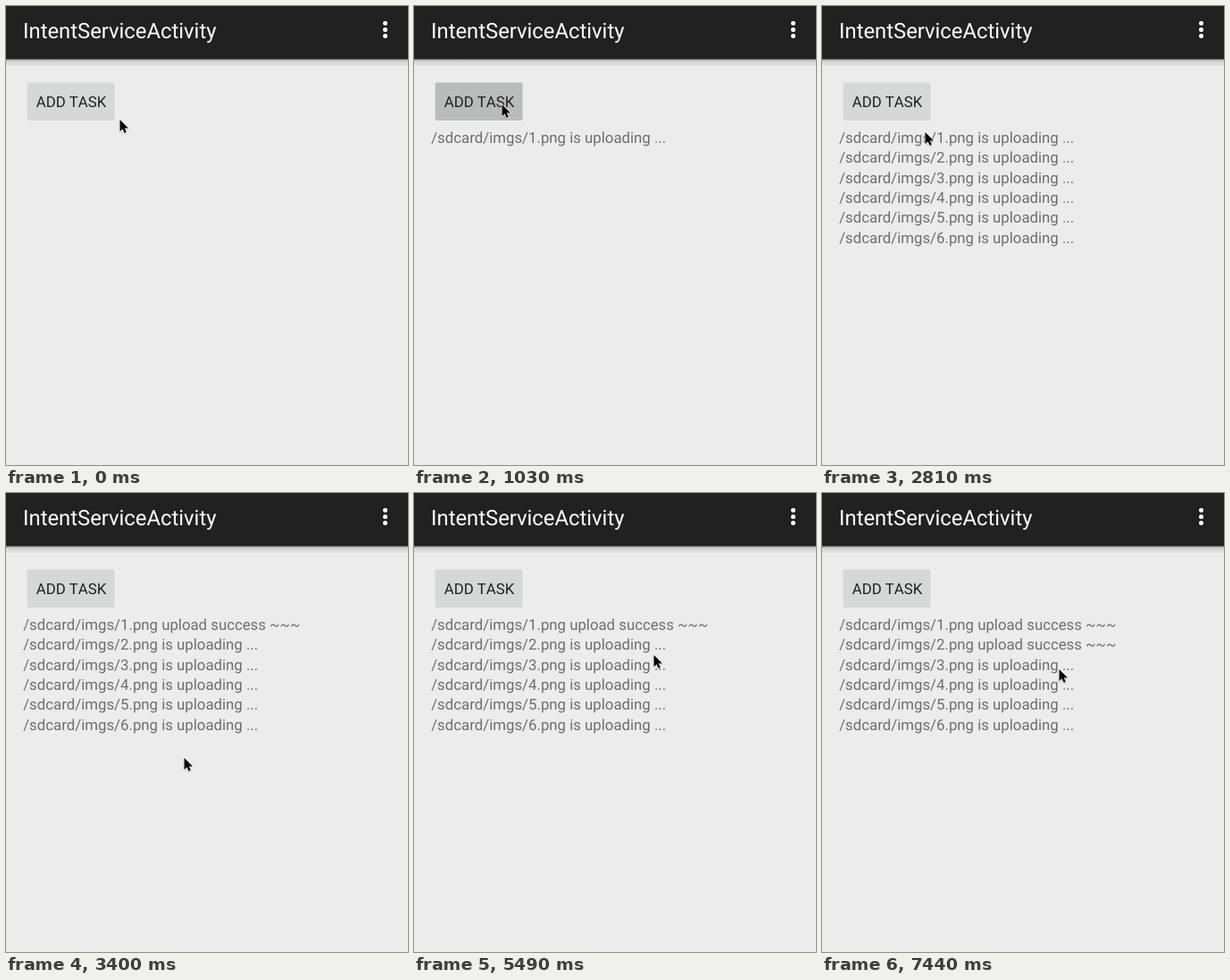
These frames come from a looping animation (450 px wide and 513 px high, 8 s). An HTML page:

```html
<!DOCTYPE html>
<html lang="en">
<head>
<meta charset="utf-8">
<title>IntentServiceActivity</title>
<style>
  html, body { margin: 0; width: 100%; height: 100%; overflow: hidden; background: #ececec; }
  svg { display: block; width: 450px; height: 513px; }
  text {
    font-family: Roboto, sans-serif; font-size: 16.8px;
    font-kerning: none; text-rendering: geometricPrecision;
  }
  .title { font-size: 23.85px; }
</style>
</head>
<body>
<svg viewBox="0 0 450 513">
  <defs>
    <linearGradient id="fade" x1="0" y1="0" x2="0" y2="1">
      <stop offset="0" stop-opacity=".45"/>
      <stop offset=".25" stop-opacity=".13"/>
      <stop offset="1" stop-opacity=".02"/>
    </linearGradient>
    <path id="arrow" d="M1.5 .9V14.2L4.6 11.4L6.7 16L8.8 15.1L6.8 10.6H11Z"/>
    <filter id="soft" x="-50%" y="-50%" width="200%" height="200%">
      <feGaussianBlur stdDeviation=".8"/>
    </filter>
  </defs>
  <rect width="450" height="513" fill="#ececec"/>
  <rect y="59.5" width="450" height="7.5" fill="url(#fade)"/>
  <rect width="450" height="59.5" fill="#212121"/>
  <text class="title" x="19" y="36.4" fill="#fff">IntentServiceActivity</text>
  <g id="dots" fill="#fff"></g>
  <rect id="button" x="23.7" y="85.6" width="97.8" height="42.4" rx="2"/>
  <text x="73" y="113" fill="#212121" text-anchor="middle">ADD TASK</text>
  <g id="list" fill="#6e6e6e"></g>
  <g id="cursor">
    <use href="#arrow" y="1.2" opacity=".35" filter="url(#soft)"/>
    <use href="#arrow" stroke="#fff" stroke-width="1.4" stroke-linejoin="round" style="paint-order:stroke"/>
  </g>
</svg>
<script>
  const LOOP = 8000, BEAT = 148.8, LEAD = 0.18;
  const byId = id => document.getElementById(id);
  const button = byId('button'), list = byId('list'), cursor = byId('cursor');

  // Cursor glides in beats: start, end, x, y
  const glides = [
    [0, 1, 97, 109], [18, 19, 114, 140], [19, 20, 198, 295], [32, 33, 220, 234],
    [33, 37, 267, 180], [44, 46, 266, 188], [48, 50, 264, 196]
  ];
  const taps = [3, 8, 10, 11, 12, 13];
  const slowTaps = taps.slice(0, 2);
  const doneAt = i => 23 + 20 * i;
  const easeOut = u => Math.sin(u * Math.PI / 2);

  function add(parent, tag, attrs) {
    const el = document.createElementNS('http://www.w3.org/2000/svg', tag);
    for (const key in attrs) el.setAttribute(key, attrs[key]);
    parent.append(el);
    return el;
  }

  for (let i = 0; i < 3; i++) add(byId('dots'), 'circle', { cx: 424.5, cy: 19.2 + 7.2 * i, r: 2.5 });
  const rows = taps.map((_, i) => add(list, 'text', { x: 19.2, y: 152.8 + 22.4 * i }));

  function cursorAt(beat) {
    let x = 126, y = 126;
    for (const [start, end, toX, toY] of glides) {
      const u = Math.min(1, Math.max(0, (beat - start) / (end - start)));
      x += (toX - x) * easeOut(u);
      y += (toY - y) * easeOut(u);
    }
    return [x, y];
  }

  function rowText(i, beat) {
    if (beat < taps[i]) return '';
    const state = beat >= doneAt(i) ? 'upload success ~~~' : 'is uploading ...';
    return `/sdcard/imgs/${i + 1}.png ${state}`;
  }

  function draw(t) {
    const beat = Math.floor(t / BEAT + LEAD);
    const [x, y] = cursorAt(beat).map(Math.round);
    cursor.setAttribute('transform', `translate(${x} ${y})`);
    button.setAttribute('fill', slowTaps.includes(beat + 1) ? '#b9bcbb' : '#d6d7d7');
    rows.forEach((row, i) => { row.textContent = rowText(i, beat); });
  }

  const begin = performance.now();
  function tick() {
    draw((performance.now() - begin) % LOOP);
    requestAnimationFrame(tick);
  }
  tick();
</script>
</body>
</html>
```
